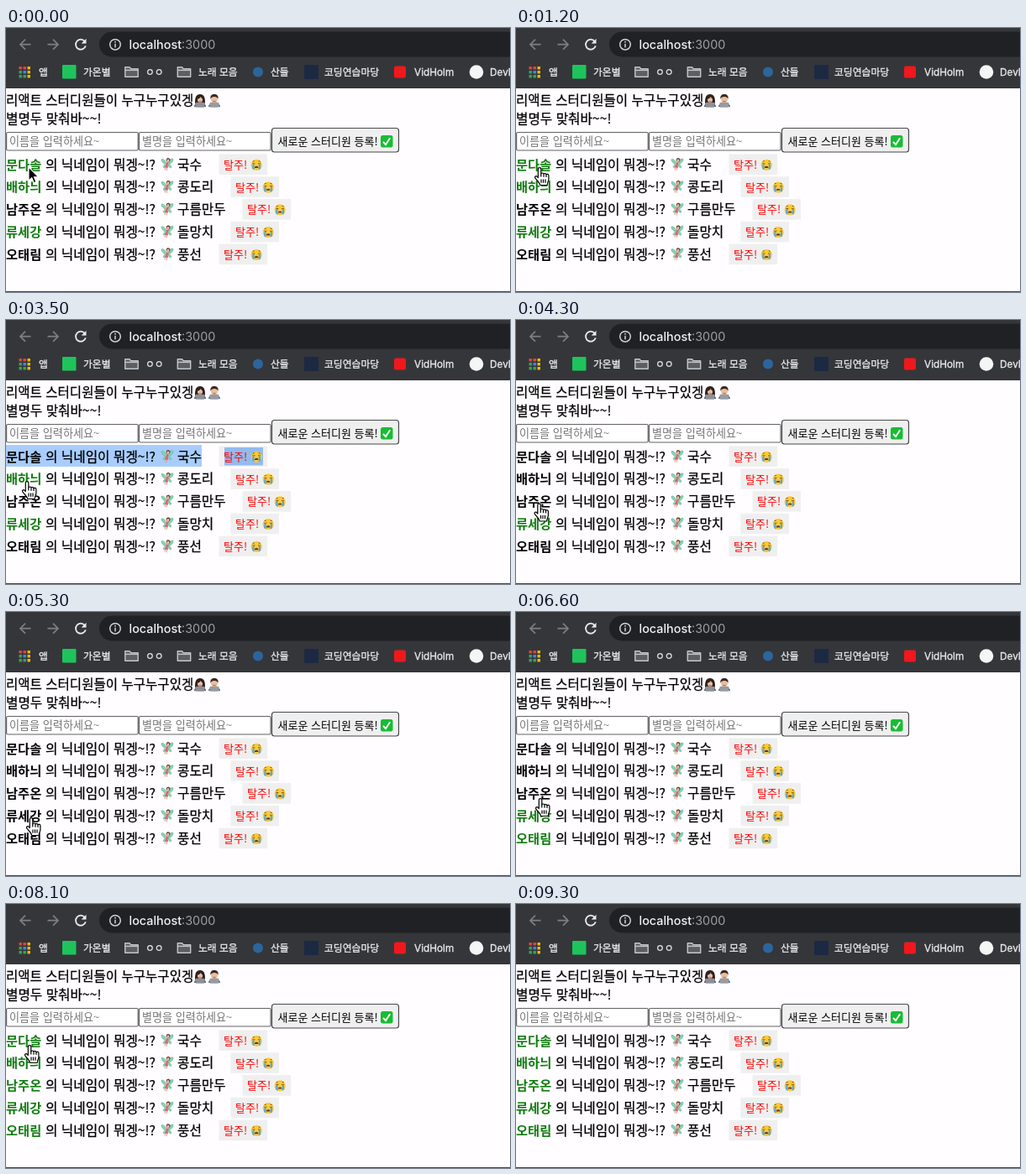
An HTML page that plays this animation: 600x315 px, repeating every 9.4 s.

```html
<!DOCTYPE html>
<html lang="ko">
<head>
<meta charset="utf-8">
<title>스터디원 목록</title>
<style>
  html, body { margin: 0; width: 100%; height: 100%; overflow: hidden; background: #fffdff; }
  svg { display: block; width: 600px; height: 315px; }
  text { font-family: "Noto Sans CJK KR", "Noto Sans CJK JP", sans-serif; white-space: pre; }
  .page { font-size: 15.7px; stroke: #000; stroke-width: .25px; }
  .title { font-size: 15.55px; }
  .name { font-size: 15.3px; font-weight: 700; stroke: none; }
  .hint { font-size: 13.1px; fill: #757575; }
  .small { font-size: 13px; }
  .mark { font-size: 11.8px; fill: #e8eaed; stroke: #e8eaed; stroke-width: .3px; }
  .latin { font-family: Inter, Roboto, sans-serif; }
</style>
</head>
<body>
<svg viewBox="0 0 600 315">
  <defs>
    <g id="folder" fill="#5d5e62" stroke="#c4c7cb" stroke-width="1.4" stroke-linejoin="round">
      <path d="M.8 12.2V.8H6l1.8 2h8.4v9.4z"/>
      <path d="M.8 4.4h15.4"/>
    </g>
    <g id="woman">
      <path d="M2.2 12C1.4 5 3.4.6 8 .6s6.600 4.400 5.800 11.400z" fill="#2c2123"/>
      <path d="M1 15.500c0-3.400 3-4.600 7-4.600s7 1.200 7 4.600z" fill="#56506a"/>
      <ellipse cx="8" cy="6.800" rx="3" ry="3.800" fill="#eebd98"/>
      <path d="M4.400 6.200c2 0 3.600-1 4.400-2.600.6 1.400 1.600 2.200 2.900 2.600C11.500 1 4.600 1 4.400 6.200z" fill="#2c2123"/>
      <path d="M6.800 9q1.200.9 2.400 0" fill="none" stroke="#b4473f" stroke-width=".8"/>
      <rect x="2.600" y="10.200" width="10.800" height="6" rx=".8" fill="#8d9098"/>
    </g>
    <g id="man">
      <path d="M1 15.500c0-3.400 3-4.600 7-4.600s7 1.200 7 4.600z" fill="#4d6f8c"/>
      <ellipse cx="8" cy="6.600" rx="4" ry="4.600" fill="#eebd98"/>
      <path d="M3.600 6.600C2.600 2 5 .4 8 .4s5.400 1.600 4.400 6.200C11.800 4.400 10.500 3.600 8 3.600s-3.800.8-4.400 3z" fill="#3a2824"/>
      <path d="M6.400 8.800q1.600 1.100 3.200 0" fill="none" stroke="#8a4a3c" stroke-width=".8"/>
      <rect x="2.600" y="10.200" width="10.800" height="6" rx=".8" fill="#989ba3"/>
    </g>
    <g id="fairy">
      <g fill="#7fd6ba" stroke="#48a98c" stroke-width=".5">
        <path d="M7.500 8C5 2.500 1.500 1.500 1 3S3 8.500 7.500 8.500z"/>
        <path d="M8.500 8C11 2 14.500 1 15 2.500S13 8.500 8.500 8.500z"/>
        <path d="M7.500 8.500C4 9 2.500 11.500 3.500 12.500S7 11.500 7.500 8.500z"/>
        <path d="M8.500 8.500C12 9 13.500 11.500 12.500 12.500S9 11.500 8.500 8.500z"/>
      </g>
      <g transform="rotate(14 8 8)">
        <path d="M7.300 12l-.6 4M8.700 12l.4 4M6.800 7.200L4.500 9.500M9.200 7.200L11.500 8.500" stroke="#dda685" stroke-width="1.100"/>
        <path d="M6.700 6.200h2.600l-.5 2.300 1.300 4.200H5.900l1.300-4.200z" fill="#dc5f73"/>
        <circle cx="8" cy="3.400" r="2.400" fill="#6b3728"/>
        <ellipse cx="8" cy="4.200" rx="1.500" ry="1.800" fill="#efbd9b"/>
      </g>
    </g>
    <g id="sob">
      <circle r="6.600" fill="#fcc934"/>
      <path d="M-4.800-1.700q1.600 1 3 0M1.800-1.700q1.400 1 3 0M-4.500-4l2-.7M4.500-4l-2-.7" fill="none" stroke="#6b4215" stroke-width=".9"/>
      <path d="M-2.400 3.700C-2.300.8 2.300.8 2.400 3.700z" fill="#68341d"/>
      <path d="M-4.700-.9h2.100v6.500q-1.300.6-2.500-1.500zM4.700-.9H2.600v6.500q1.300.6 2.500-1.500z" fill="#51a9e8"/>
    </g>
    <path id="arrow" d="M0 0V16.200l3.700-3.500 2.600 6 2.700-1.200-2.600-5.700h5.200z" fill="#000" stroke="#fff" stroke-width="1.100"/>
    <g id="hand" transform="translate(-6.500 0)" stroke="#000" stroke-width="1.200" stroke-linejoin="round">
      <path fill="#fff" d="M4.800 12.500V2.300a1.750 1.750 0 0 1 3.500 0V8c.5-1.500 3-1.300 3.200.3.500-1.200 2.800-1 3 .6.700-1 2.900-.6 2.900 1v4.500c0 2.500-1.500 3.300-1.700 7.100H7.200c-.4-3-2.900-4.400-5.800-8.300-1.300-1.800 1-3.200 2.300-1.900z"/>
      <path fill="none" d="M8.300 8v3.500M11.500 8.400v3.300M14.500 9v3M8.500 14.500v4.200M11 14.500v4.200M13.500 14.500v4.200"/>
    </g>
  </defs>

  <rect width="600" height="315" fill="#fffdff"/>
  <rect width="600" height="72" fill="#35363a"/>

  <g fill="none" stroke="#7d7f83" stroke-width="1.700">
    <path d="M29.500 19.700H17.500M23 13.700l-6 6 6 6"/>
    <path d="M49.500 19.700h12M56 13.700l6 6-6 6"/>
    <path d="M94 16.300a6 6 0 1 0 .8 5" stroke="#e8eaed" stroke-width="1.800"/>
  </g>
  <path d="M95.500 12.800v5.800h-5.800z" fill="#e8eaed"/>
  <rect x="111" y="4.500" width="520" height="30" rx="15" fill="#202124"/>
  <g stroke="#d0d3d7" fill="none" stroke-width="1.500">
    <circle cx="130" cy="19.700" r="6.300"/>
    <path d="M130 18.700v4.500M130 15.800v1.600"/>
  </g>
  <text class="latin" x="146.500" y="25" font-size="14.400" font-weight="500" fill="#f1f3f4">localhost<tspan font-weight="400" fill="#9aa0a6">:3000</tspan></text>

  <g id="apps"></g>
  <rect x="67" y="44" width="16.500" height="16.500" rx="1" fill="#1ec45b"/>
  <use href="#folder" x="141" y="46"/>
  <use href="#folder" x="203.500" y="46"/>
  <circle cx="300" cy="52.500" r="6" fill="#2c659c"/>
  <rect x="355" y="44" width="17" height="17" fill="#1c2942"/>
  <rect x="462" y="45.500" width="14" height="14" rx="2" fill="#f0181c"/>
  <circle cx="560" cy="52.500" r="8.300" fill="#f5f5f6"/>
  <g id="marks"></g>

  <text class="page title" x="0" y="92">리액트 스터디원들이 누구누구있겡</text>
  <use href="#woman" x="223" y="78.500"/>
  <use href="#man" x="240" y="78.500"/>
  <text class="page" x="0" y="114">별명두 맞춰바~~!</text>

  <g fill="#fff" stroke="#626266" stroke-width="1.200">
    <rect x=".6" y="124.500" width="156.600" height="21.500" rx="1.500"/>
    <rect x="158.500" y="124.500" width="156.600" height="21.500" rx="1.500"/>
    <rect x="316.500" y="119.500" width="151" height="28.500" rx="3" fill="#efefef" stroke="#48494c"/>
  </g>
  <text class="hint" x="4" y="140">이름을 입력하세요~</text>
  <text class="hint" x="162" y="140">별명을 입력하세요~</text>
  <text class="small" x="323.500" y="140">새로운 스터디원 등록!</text>
  <rect x="446" y="128" width="14.500" height="14.500" rx="2.500" fill="#16bd32"/>
  <path d="M449 135.800l3 3.400 5.200-8" fill="none" stroke="#fff" stroke-width="2"/>

  <rect id="lineSelection" y="149" width="233" height="26" fill="#a8cdfd"/>
  <g id="rows"></g>
  <rect y="314" width="600" height="1" fill="#4a4a4c"/>
  <g id="cursor"><use id="pointer" href="#arrow"/></g>
</svg>

<script>
const LOOP = 9400, STEP = 100;
const byId = id => document.getElementById(id);

const bookmarks = [
  [39, '앱'], [92, '가온별'], [166, 'ㅇㅇ'], [229, '노래 모음'], [315, '산들'],
  [379, '코딩연습마당'], [486, 'VidHolm', 'latin'], [576, 'DevNook', 'latin']
];
byId('marks').innerHTML = bookmarks.map(([x, label, extra = '']) =>
  `<text class="mark ${extra}" x="${x}" y="56.5">${label}</text>`).join('');

const dotColors = ['#ea4335', '#ea4335', '#fbbc04', '#34a853', '#4285f4', '#fbbc04', '#34a853', '#34a853', '#fbbc04'];
byId('apps').innerHTML = dotColors.map((color, i) =>
  `<rect x="${15.5 + i % 3 * 5}" y="${46 + Math.floor(i / 3) * 5}" width="3.4" height="3.4" fill="${color}"/>`).join('');

// flips: moments at which a click switches the name between green and black
const members = [
  { name: '문다솔', nick: '국수', buttonX: 253.5, green: true, flips: [1000, 1200, 1400, 1600, 2600, 7800] },
  { name: '배하늬', nick: '콩도리', buttonX: 267.5, green: true, flips: [3800, 7300] },
  { name: '남주온', nick: '구름만두', buttonX: 281.5, green: false, flips: [6800] },
  { name: '류세강', nick: '돌망치', buttonX: 267.5, green: true, flips: [4900, 6300] },
  { name: '오태림', nick: '풍선', buttonX: 253.5, green: false, flips: [5800] }
];
byId('rows').innerHTML = members.map(({ name, nick, buttonX }, i) => `
  <g transform="translate(0 ${162.5 + i * 26.8})">
    <text class="page name" x="0" y="6">${name}</text>
    <text class="page" x="47" y="6">의 닉네임이 뭐겡~!?</text>
    <use href="#fairy" x="184" y="-8.5"/>
    <text class="page" x="204" y="6">${nick}</text>
    <g transform="translate(${buttonX} 0)">
      <rect y="-12" width="57.5" height="24.5" fill="#efefef"/>
      ${i ? '' : '<rect id="buttonSelection" x="6.5" y="-10.5" width="46" height="21.5" fill="#92bbee"/>'}
      <text class="small" x="5.5" y="5.3" fill="#f00">탈주!</text>
      <use href="#sob" x="44.7" y=".8"/>
    </g>
  </g>`).join('');
const names = [...document.querySelectorAll('.name')];

// time, x and y of the pointer's tip
const path = [
  [0, 27, 166], [400, 27, 166], [700, 28, 166], [3000, 28, 166], [3400, 25, 192],
  [4000, 25, 192], [4600, 30, 245], [5300, 30, 245], [5700, 29, 269], [5900, 29, 269],
  [6200, 30, 246], [6300, 30, 246], [6600, 29, 222], [6900, 29, 222], [7200, 27, 195],
  [7400, 27, 195], [7700, 28, 168], [8400, 28, 168], [9000, -24, 172], [LOOP, -24, 172]
];

function pointerAt(t) {
  const next = path.findIndex(key => key[0] > t);
  const [t0, x0, y0] = path[next - 1], [t1, x1, y1] = path[next];
  const p = (t - t0) / (t1 - t0), ease = p * p * (3 - 2 * p);
  return [x0 + (x1 - x0) * ease, y0 + (y1 - y0) * ease];
}

function draw(t) {
  members.forEach(({ green, flips }, i) => {
    const flipped = flips.filter(moment => moment <= t).length % 2 === 1;
    names[i].setAttribute('fill', green !== flipped ? '#107c10' : '#000');
  });
  const selected = t >= 1400 && t < 3800 ? 'visible' : 'hidden';
  byId('lineSelection').setAttribute('visibility', selected);
  byId('buttonSelection').setAttribute('visibility', selected);
  byId('cursor').setAttribute('transform', `translate(${pointerAt(t)})`);
  byId('pointer').setAttribute('href', t < 500 ? '#arrow' : '#hand');
}

const start = performance.now();
function tick() {
  const t = (performance.now() - start) % LOOP;
  draw(Math.floor(t / STEP) * STEP);
  requestAnimationFrame(tick);
}
tick();
</script>
</body>
</html>
```
